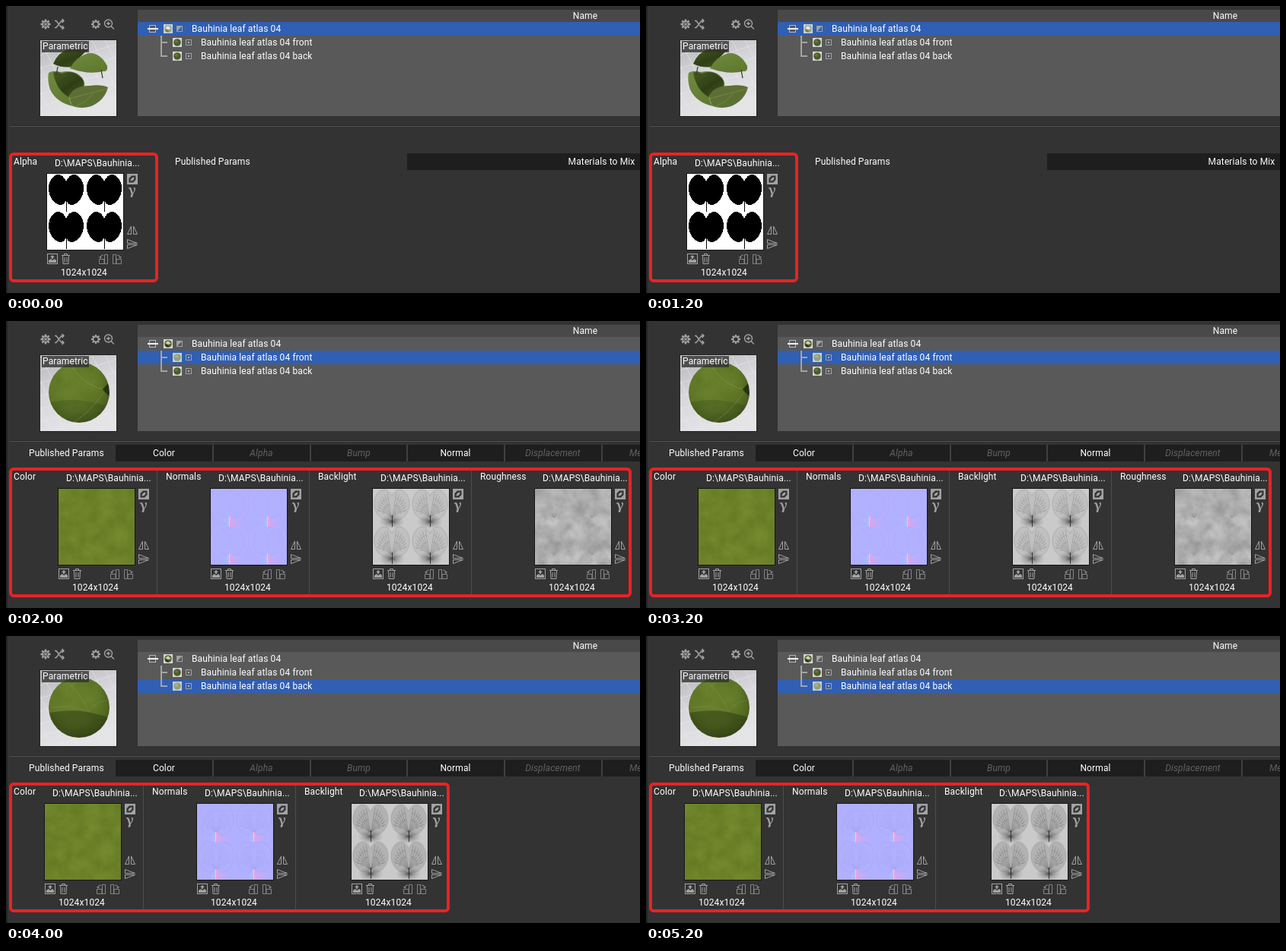
An HTML page for the animation above (6000 ms loop, 833 by 378 pixels).

```html
<!DOCTYPE html>
<html lang="en">
<head>
<meta charset="utf-8">
<title>Material maps</title>
<style>
html, body { margin: 0; width: 100%; height: 100%; overflow: hidden; background: #333; }
#stage { display: block; width: 833px; height: 378px; }
text { font: 12px Roboto, sans-serif; letter-spacing: .12px; fill: #fff; white-space: pre; }
.mid { text-anchor: middle; }
.off { fill: #626262; font-style: italic; }
.gamma { font: 700 17px "Noto Serif", serif; fill: #a2a2a2; }
.line { fill: none; stroke: #a2a2a2; stroke-width: 1; }
.solid { fill: #a2a2a2; }
</style>
</head>
<body>
<svg id="stage" viewBox="0 0 833 378" xmlns="http://www.w3.org/2000/svg">
  <defs>
    <filter id="moss" x="0" y="0" width="1" height="1" color-interpolation-filters="sRGB">
      <feTurbulence type="fractalNoise" baseFrequency=".055" numOctaves="3" seed="4"/>
      <feColorMatrix values=".09 0 0 0 .38  .09 0 0 0 .465  .06 0 0 0 .13  0 0 0 0 1"/>
    </filter>
    <filter id="fog" x="0" y="0" width="1" height="1" color-interpolation-filters="sRGB">
      <feTurbulence type="fractalNoise" baseFrequency=".06" numOctaves="5" seed="9"/>
      <feColorMatrix values=".25 0 0 0 .57  .25 0 0 0 .57  .25 0 0 0 .57  0 0 0 0 1"/>
    </filter>
    <linearGradient id="floor" x2=".4" y2="1">
      <stop stop-color="#b5b5ba"/><stop offset=".5" stop-color="#d8d8dc"/><stop offset="1" stop-color="#e4e4e7"/>
    </linearGradient>
    <radialGradient id="shade" cx=".42" cy=".36" r=".7">
      <stop stop-color="#66803a" stop-opacity=".3"/><stop offset=".6" stop-color="#4a6222" stop-opacity=".4"/>
      <stop offset="1" stop-color="#2a3a14" stop-opacity=".7"/>
    </radialGradient>
    <linearGradient id="leafLight" x2=".5" y2="1">
      <stop stop-color="#71883f"/><stop offset="1" stop-color="#5f7a30"/>
    </linearGradient>
    <linearGradient id="leafDark" x2=".8" y2="1">
      <stop stop-color="#465a20"/><stop offset=".6" stop-color="#2f3f14"/><stop offset="1" stop-color="#405322"/>
    </linearGradient>
    <radialGradient id="dusk">
      <stop stop-color="#222" stop-opacity=".75"/><stop offset=".4" stop-color="#444" stop-opacity=".35"/>
      <stop offset="1" stop-color="#777" stop-opacity="0"/>
    </radialGradient>
    <linearGradient id="pink">
      <stop stop-color="#f0a0dc"/><stop offset="1" stop-color="#d8a8f8" stop-opacity="0"/>
    </linearGradient>
    <linearGradient id="cyan">
      <stop stop-color="#a8b8ff" stop-opacity="0"/><stop offset="1" stop-color="#a4d4ff"/>
    </linearGradient>
    <clipPath id="disc"><circle cx="96" cy="94" r="40"/></clipPath>
    <path id="leaf" d="M0 9C-2 4-6 0-10 0C-18 0-24 11-23 21C-22 31-15 39-9 40C-5 41-2 38 0 34C2 38 5 41 9 40C15 39 22 31 23 21C24 11 18 0 10 0C6 0 2 4 0 9Z"/>
    <g id="tools">
      <rect class="solid" x="105" width="14" height="14"/>
      <path d="M107.5 11.5V6L111 2.5H116.5V8L113 11.5Z" fill="#333"/>
      <path class="solid" d="M109.5 9.5Q109.5 5 114.5 4.5Q114.5 9.5 109.5 9.5Z"/>
      <text class="gamma mid" x="112" y="27">γ</text>
      <path class="line" d="M110.5 69V79.5H105.5Z"/>
      <path class="line" d="M113.5 69V79.5H118.5Z" fill="#777"/>
      <path class="line" d="M105.5 86.5L118.5 91.5H105.5Z"/>
      <path class="line" d="M105.5 98.5L118.5 93.5H105.5Z"/>
      <rect class="line" x=".5" y="105.5" width="13" height="13"/>
      <path class="solid" d="M2 117V114L5 112L7 114L10 112L12 114V117ZM7 107L10 110H8V112H6V110H4Z"/>
      <path class="line" d="M19 107.5H30M22.5 107V105.5H26.5V107M20.5 108L21 118.5H28L28.5 108M23 110V116.5M26 110V116.5"/>
      <g opacity=".75">
        <path class="line" d="M75.5 106.5H79.5V118.5H75.5ZM68.5 112.5H75V118.5H68.5ZM70 110Q70 107 74 107"/>
        <path class="solid" d="M68 109H72L70 112Z"/>
        <path class="line" d="M86.5 106.5H90.5V118.5H86.5ZM91 112.5H97.5V118.5H91ZM92 107Q96 107 96 110"/>
        <path class="solid" d="M94 109H98L96 112Z"/>
      </g>
    </g>
  </defs>
</svg>
<script>
const STEP = 2000, LOOP = 3 * STEP;
const stage = document.getElementById('stage');

const rect = (x, y, w, h, fill, more = '') =>
  `<rect x="${x}" y="${y}" width="${w}" height="${h}" fill="${fill}" ${more}/>`;
const text = (x, y, s, cls = '') => `<text x="${x}" y="${y}" class="${cls}">${s}</text>`;
const path = (d, fill, more = '') => `<path d="${d}" fill="${fill}" ${more}/>`;
const disc = (x, y, r, fill) => `<circle cx="${x}" cy="${y}" r="${r}" fill="${fill}"/>`;
const stroke = (color, w = 1) => `stroke="${color}" stroke-width="${w}"`;

// Repeats a drawing at the four leaf positions of a map.
const atlas = draw => [[25, 1], [75, 1], [25, 50], [75, 50]]
  .map(([x, y]) => `<g transform="translate(${x} ${y})">${draw}</g>`).join('');
const leaf = (fill, more = '') => `<use href="#leaf" fill="${fill}" ${more}/>`;

function veins(color, w) {
  let d = '';
  for (const side of [-1, 1]) {
    for (let a = .3; a < 1.6; a += .2) {
      const x = side * 20 * Math.sin(a), y = 28 - 25 * Math.cos(a);
      d += `M0 37Q${(x * .65).toFixed(1)} ${(y * .4 + 17).toFixed(1)} ${x.toFixed(1)} ${y.toFixed(1)}`;
      for (const t of [.5, .75]) {
        const bx = x * t, by = 37 + (y - 37) * t;
        d += `M${bx.toFixed(1)} ${by.toFixed(1)}l${side * 3} -1`;
      }
    }
  }
  return path(d, 'none', stroke(color, w));
}

const full = (fill, more) => rect(0, 0, 100, 100, fill, more);
const normals = veined => full('#b1afff') + atlas(
  rect(-12, 32, 12, 17, 'url(#cyan)', 'opacity=".5"') +
  rect(0, 32, 18, 17, 'url(#pink)', 'opacity=".7"') +
  leaf('#b0b0ff', stroke(veined ? '#a9a8f6' : '#c2b8fc', .8)) +
  veins(veined ? '#a4a5f2' : '#b7b4ff', .5) +
  rect(-1, 36, 1, 13, '#b8e0ff') + rect(0, 36, 1, 13, '#f0a0d4'));
const backlight = (body, line) => full('#cacaca') + atlas(
  leaf(body, stroke('#a0a0a0', .6)) + veins(line, .5) +
  '<ellipse cy="42" rx="17" ry="10" fill="url(#dusk)"/>' + rect(0, 34, 1, 15, '#333'));

const maps = {
  Alpha: full('#fff') +
    `<g shape-rendering="crispEdges">${atlas(leaf('#000') + rect(0, 33, 1, 16, '#000'))}</g>`,
  Color: full('#6c8229', 'filter="url(#moss)"'),
  Bumpy: normals(false),
  Veined: normals(true),
  Pale: backlight('#c0c0c0', '#8c8c8c'),
  Deep: backlight('#b2b2b2', '#747474'),
  Rough: full('#b2b2b2', 'filter="url(#fog)"') +
    atlas(leaf('#a4a4a4', 'opacity=".2"') + `<g opacity=".12">${veins('#555', .6)}</g>`)
};

function slot(labelX, x, label, map) {
  return text(labelX, 209, label) + text(x + 10, 211, 'D:\\MAPS\\Bauhinia...') +
    rect(x - 1, 220, 102, 102, '#161616') +
    `<svg x="${x}" y="221" width="100" height="100">${maps[map]}</svg>` +
    `<use href="#tools" x="${x}" y="221"/>` +
    text(x + 18, 355, '1024x1024');
}

const divider = x => rect(x, 194, 1, 166, '#4c4c4c');
const frame = right =>
  `<rect x="6" y="195" width="${right - 8}" height="167" rx="4" fill="none" ${stroke('#ea2224', 4)}/>`;

function tabs() {
  const names = ['Color', 'Alpha', 'Bump', 'Normal', 'Displacement', 'Metalness'];
  return rect(144, 163, 689, 22, '#1e1e1e') + text(30, 178, 'Published Params') +
    names.map((name, i) => {
      const x = 144 + Math.round(i * 127.8);
      const live = name === 'Color' || name === 'Normal';
      return (i ? rect(x - 1, 163, 2, 22, '#404040') : '') +
        text(x + 63.5, 178, name, live ? 'mid' : 'mid off');
    }).join('');
}

// Tree row thumbnails; the selected row is drawn lighter.
function thumbs(selected) {
  return [[213, 30], [225, 48], [225, 66]].map(([x, y], i) => {
    const on = i === selected;
    let s = rect(x - 6, y - 6, 12, 12, on ? '#c6d0dc' : '#d6d6d6') +
      disc(x, y, 4.8, on ? '#93a07a' : '#4b5c28');
    if (i === 0) {
      s += path(`M${x - 4} ${y - 1}L${x} ${y - 4}L${x + 4} ${y}L${x} ${y + 1}Z`, on ? '#e5e9df' : '#c8cfb8') +
        path(`M${x - 4} ${y + 1}Q${x} ${y + 1} ${x + 1} ${y + 4}Q${x - 3} ${y + 5} ${x - 4} ${y + 1}Z`, on ? '#6c8248' : '#2a3811');
    } else {
      s += disc(x - 1, y - 1.5, 2.3, on ? '#a5b08c' : '#61743a');
    }
    return s;
  }).join('');
}
const row = i => rect(173, 21 + 18 * i, 660, 18, '#305fb3') + thumbs(i);

const leafBall =
  path('M62 76Q68 61 84 56L109 57Q96 66 88 80Q73 82 62 76Z', 'url(#leafDark)') +
  path('M84 82Q92 67 108 62Q124 61 133 79Q134 87 128 86Q108 91 84 82Z', 'url(#leafLight)') +
  path('M56 88Q62 84 72 87Q85 84 95 90Q105 97 103 107Q89 110 83 119Q83 126 88 132Q66 127 58 110Q54 98 56 88Z', 'url(#leafLight)') +
  path('M62 88Q67 85 73 89Q87 84 96 92Q105 99 101 106Q88 108 82 120Q66 110 62 88Z', 'url(#leafDark)') +
  path('M83 119Q89 105 110 105Q125 103 134 107Q130 124 112 132Q99 136 88 132Q84 127 83 119Z', '#5d7034') +
  path('M84 122Q105 116 133 109M92 132Q106 126 114 115', 'none', stroke('#7d8d52', .7)) +
  path('M68 80L66 91M125 84L127 95', 'none', stroke('#35451a', 1.3));

const ball = extra =>
  `<g clip-path="url(#disc)">${rect(56, 54, 80, 80, '#607a28', 'filter="url(#moss)"')}` +
  disc(96, 94, 40, 'url(#shade)') + extra + '</g>';
const frontBall = ball(
  path('M136 80L127 90L136 100Z', '#26320f') +
  path('M58 108Q90 98 136 113V135H58Z', '#2c3f14', 'opacity=".25"') +
  path('M85 55Q94 80 127 90M88 134Q112 119 128 94', 'none', stroke('#859c4b', .5)));
const backBall = ball(
  path('M55 102Q92 92 137 108V136H55Z', '#1c290d', 'opacity=".4"') +
  path('M76 57Q98 74 109 99M136 85Q117 85 109 99M58 94Q84 91 109 99', 'none', stroke('#819550', .4)));

function gear(x, y, r) {
  let d = '';
  for (let i = 0; i < 8; i++) {
    const c = Math.cos(i * Math.PI / 4), s = Math.sin(i * Math.PI / 4);
    d += `M${x + c * (r - 2.5)} ${y + s * (r - 2.5)}L${x + c * r} ${y + s * r}`;
  }
  return path(d, 'none', stroke('#a2a2a2', 2.4)) +
    `<circle cx="${x}" cy="${y}" r="${r - 2.6}" fill="none" ${stroke('#a2a2a2', 1.6)}/>`;
}

const toolbar =
  gear(52, 24, 6.5) + path('M49 21L55 27M55 21L49 27M48 24H56M52 20V28', 'none', stroke('#a2a2a2', .9)) +
  path('M64 19.5H66L73 28.5H76M64 28.5H66L73 19.5H76M73.5 17L76 19.5L73.5 22M73.5 26L76 28.5L73.5 31', 'none', stroke('#a2a2a2', 1.5)) +
  gear(118, 24, 6) +
  `<circle cx="134.5" cy="23" r="5" fill="none" ${stroke('#a2a2a2', 1.4)}/>` +
  path('M132 23H137M134.5 20.5V25.5M138 26.5L142 30.5', 'none', stroke('#a2a2a2', 1.4));

let grid = '';
for (let i = -4; i < 9; i++) grid += `M${i * 17} 0L${i * 17 + 50} 101M0 ${i * 17 + 20}L101 ${i * 17 - 12}`;

const base =
  rect(0, 0, 833, 378, '#333') + rect(0, 0, 2, 378, '#232323') +
  rect(173, 5, 660, 140, '#595959') + rect(173, 5, 660, 16, '#494949') +
  text(761, 17, 'Name', 'mid') +
  rect(5, 157, 828, 1, '#272727') + rect(5, 158, 828, 1, '#545454') +
  toolbar + rect(44, 44, 102, 102, '#222') +
  `<svg x="45" y="45" width="100" height="100">${full('url(#floor)')}${path(grid, 'none', stroke('#eaeaed', .5))}</svg>`;

const mark = (x, y) => `<rect x="${x - 3.5}" y="${y - 3.5}" width="7" height="7" fill="none" ${stroke('#a0a0a0')}/>`;
const overlay =
  rect(47, 46, 62, 15, '#333', 'opacity=".8"') + text(48, 57, 'Parametric') +
  path('M204 39V66H212M204 48H212', 'none', stroke('#a4a4a4', 2)) +
  rect(188.5, 25.5, 8, 9, '#595959', stroke('#b8b8b8')) + rect(186, 29, 14, 2, '#f0f0f0') +
  mark(228, 30) + path('M225 33V27H231Z', '#a0a0a0') +
  mark(240, 48) + rect(239, 47, 2, 2, '#b4b4b4') +
  mark(240, 66) + rect(239, 65, 2, 2, '#b4b4b4') +
  text(244, 34, 'Bauhinia leaf atlas 04') +
  text(256, 52, 'Bauhinia leaf atlas 04 front') +
  text(256, 70, 'Bauhinia leaf atlas 04 back');

const scenes = [
  row(0) + leafBall + text(222, 209, 'Published Params') +
    rect(527, 194, 306, 22, '#1e1e1e') + text(782.5, 209, 'Materials to Mix', 'mid') +
    slot(10, 54, 'Alpha', 'Alpha') + frame(200),
  row(1) + frontBall + tabs() + [198, 398, 611].map(divider).join('') +
    slot(10, 69, 'Color', 'Color') + slot(210, 269, 'Normals', 'Bumpy') +
    slot(410, 482, 'Backlight', 'Pale') + slot(623, 695, 'Roughness', 'Rough') + frame(822),
  row(2) + backBall + tabs() + [180, 380].map(divider).join('') +
    slot(10, 51, 'Color', 'Color') + slot(192, 251, 'Normals', 'Veined') +
    slot(392, 454, 'Backlight', 'Deep') + frame(583)
];

stage.insertAdjacentHTML('beforeend',
  base + scenes.map(s => `<g class="scene">${s}</g>`).join('') + overlay);

document.querySelectorAll('.scene').forEach((scene, i) => {
  const steps = [0, 1, 2, 3].map(k => ({
    opacity: k % 3 === i ? 1 : 0, offset: k * STEP / LOOP, easing: 'step-end'
  }));
  scene.animate(steps, { duration: LOOP, iterations: Infinity });
});
</script>
</body>
</html>
```
